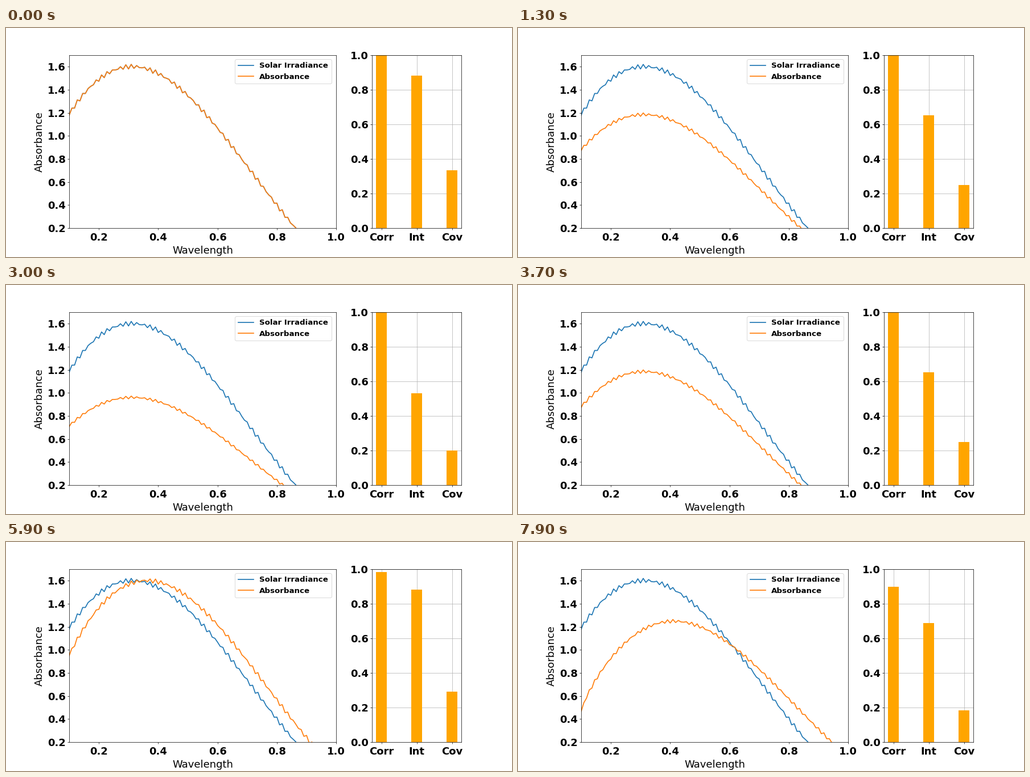
These frames come from a looping animation (889 by 404 pixels, 8 s). A matplotlib script:

```python
import numpy as np
import matplotlib.pyplot as plt
from matplotlib.animation import FuncAnimation

W, H, DPI = 889, 404, 100
FRAMES, INTERVAL = 80, 100
PT = 0.9 * 72 / DPI  # scales nominal point sizes to the stage

plt.rcParams.update({
    "font.family": "DejaVu Sans",
    "font.size": 20 * PT,
    "axes.linewidth": 0.8 * PT,
    "axes.labelpad": 5 * PT,
    "grid.linewidth": 0.8 * PT,
    "lines.linewidth": 1.9 * PT,
    "patch.linewidth": 1 * PT,
})
for axis, pad in (("xtick", 5.7), ("ytick", 3.5)):
    plt.rcParams.update({
        f"{axis}.major.size": 3.5 * PT,
        f"{axis}.major.width": 0.8 * PT,
        f"{axis}.major.pad": pad * PT,
    })

# Smooth spectrum through a few control points, plus a fast ripple.
# Fitting in sqrt(x) keeps the steep rise near zero.
KNOT_X = [0, .009, .018, .036, .055, .073, .1, .15, .2, .25, .318,
          .4, .5, .6, .65, .7, .8, .866, .9, 1]
KNOT_Y = [.598, .69, .755, .875, .98, 1.071, 1.19, 1.368, 1.492, 1.566, 1.6,
          1.543, 1.35, 1.067, .905, .736, .394, .193, .09, -.17]
SPECTRUM = np.polyfit(np.sqrt(KNOT_X), KNOT_Y, 7)
x = np.linspace(0.1, 1, 100)


def spectrum(t):
    t = np.maximum(t, 0)
    return np.polyval(SPECTRUM, np.sqrt(t)) + 0.02 * np.sin(1000 * t)


irradiance = spectrum(x)


def state(frame):
    """Return the scale and the shift of the absorbance curve."""
    if frame <= 50:
        return 0.5 + 0.02 * abs(25 - frame), 0.0
    shift = 0.01 * np.clip(frame - 54, 0, 10)
    return 1 - 0.02 * max(0, frame - 68), shift


def scores(scale, curve):
    """Correlation, integral and covariance against the irradiance."""
    return (np.corrcoef(irradiance, curve)[0, 1],
            scale * np.trapezoid(irradiance, x) if hasattr(np, "trapezoid")
            else scale * np.trapz(irradiance, x),
            np.cov(irradiance, curve)[0, 1])


def add_axes(left, right, top=48.0, bottom=353.0):
    return fig.add_axes([left / W, 1 - bottom / H, (right - left) / W, (bottom - top) / H])


def bold_ticks(ax):
    for label in ax.get_xticklabels() + ax.get_yticklabels():
        label.set_fontweight("bold")


fig = plt.figure(figsize=(W / DPI, H / DPI), dpi=DPI, facecolor="white")

curves = add_axes(111, 580.2)
curves.plot(x, irradiance, color="tab:blue", label="Solar Irradiance")
absorbance, = curves.plot(x, irradiance, color="tab:orange", label="Absorbance")
curves.set(xlim=(0.1, 1), ylim=(0.2, 1.7), xlabel="Wavelength", ylabel="Absorbance",
           xticks=np.arange(0.2, 1.1, 0.2), yticks=np.arange(0.2, 1.7, 0.2))
curves.legend(loc="upper right", prop={"size": 14.9 * PT, "weight": "bold"}, borderaxespad=0,
              bbox_to_anchor=(571.5 / W, 1 - 55 / H), bbox_transform=fig.transFigure)
bold_ticks(curves)

metrics = add_axes(643.2, 800)
bars = metrics.bar(["Corr", "Int", "Cov"], scores(1, irradiance), width=0.3, color="orange")
metrics.set(ylim=(0, 1), yticks=np.arange(0, 1.1, 0.2))
metrics.set_axisbelow(True)
metrics.grid(True)
bold_ticks(metrics)


def update(frame):
    scale, shift = state(frame)
    curve = scale * spectrum(x - shift)
    absorbance.set_ydata(curve)
    for bar, value in zip(bars, scores(scale, curve)):
        bar.set_height(value)
    return absorbance, *bars


anim = FuncAnimation(fig, update, frames=FRAMES, interval=INTERVAL, repeat=True, repeat_delay=0)
plt.show()
```
